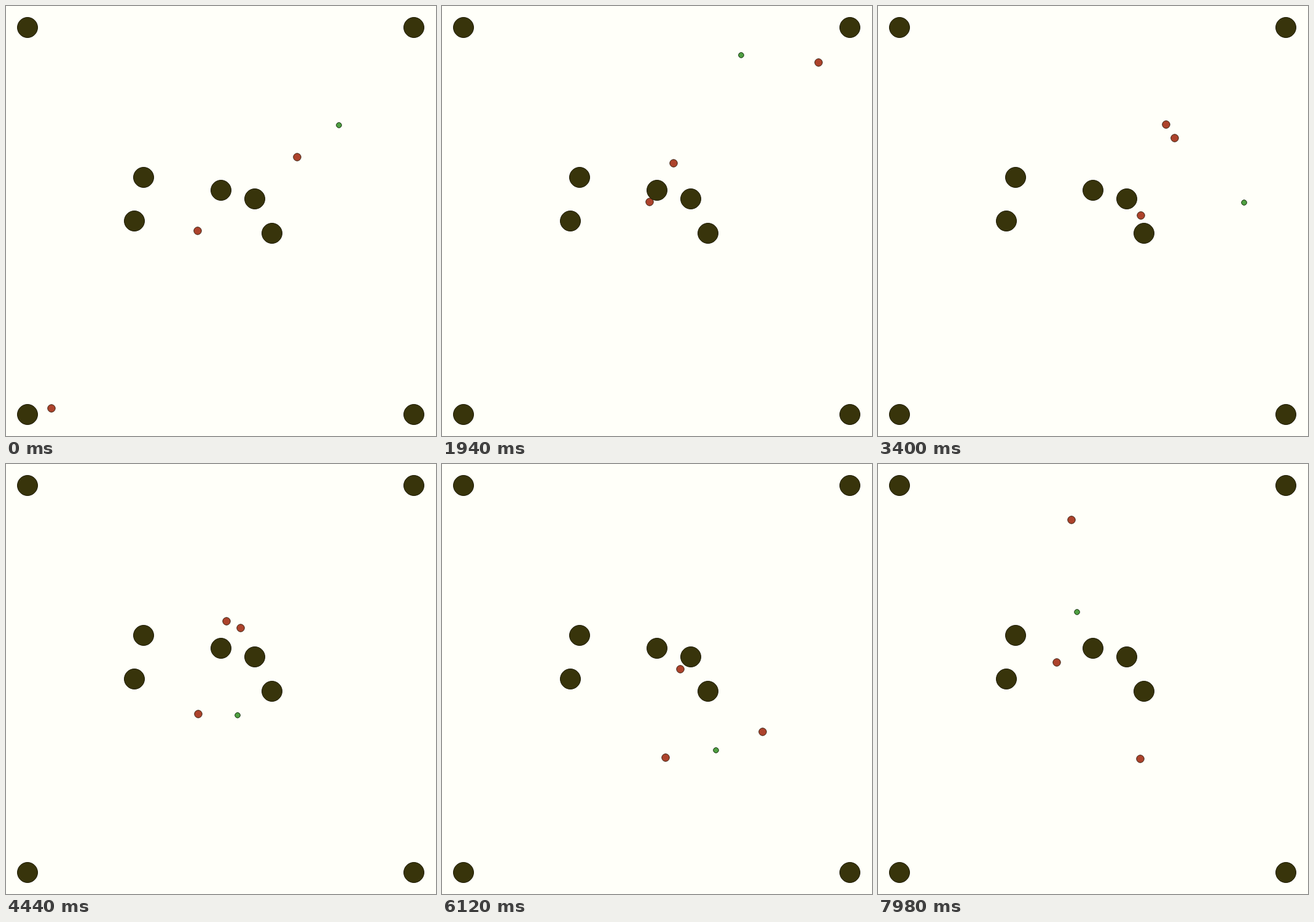
Write an HTML page with a canvas that moves like this. It is 700x700 px and loops after 8000 ms.

```html
<!DOCTYPE html>
<html lang="en">
<head>
<meta charset="utf-8">
<title>Pursuit</title>
<style>
  html, body { margin: 0; width: 100%; height: 100%; overflow: hidden; background: #fffff9; }
  canvas { display: block; }
</style>
</head>
<body>
<canvas id="stage" width="700" height="700"></canvas>
<script>
const LOOP = 8000;
const STEP = 20;
const ctx = document.getElementById('stage').getContext('2d');

const obstacles = [[224, 279], [209, 350], [350, 300], [405, 314], [433, 370]];
for (const x of [35, 664]) for (const y of [35, 665]) obstacles.push([x, y]);

// Moments at which every agent has a waypoint.
const beats = [0, 760, 1940, 3400, 4440, 6120, 7980];

// Joins the shared beats with extra turns given as [time, x, y].
function route(stops, turns) {
  return stops.map((p, i) => [beats[i], ...p])
    .concat(turns)
    .sort((a, b) => a[0] - b[0]);
}

const hunterA = route(
  [[74, 655], [163, 527], [338, 319], [428, 341], [313, 407], [364, 478], [291, 323]],
  [[1500, 308, 404], [2700, 250, 480], [5300, 220, 560], [7000, 350, 490]]
);
const hunterB = route(
  [[312, 366], [435, 228], [377, 256], [469, 193], [359, 256], [388, 334], [315, 91]],
  [[300, 312, 285], [2700, 475, 140], [5200, 475, 185], [5760, 388, 254], [6900, 285, 270]]
);
const hunterC = route(
  [[474, 246], [461, 204], [613, 92], [483, 215], [382, 267], [522, 436], [427, 480]],
  [[2500, 610, 120], [5300, 600, 340], [7000, 450, 490]]
);
const runner = route(
  [[542, 194], [530, 116], [487, 80], [596, 320], [377, 409], [446, 466], [324, 241]],
  [[380, 646, 49], [2600, 640, 60], [3850, 540, 640], [5150, 680, 62],
   [5650, 580, 370], [7000, 17, 300], [7600, 270, 50]]
);

function slope(path, i, axis) {
  const a = path[Math.max(i - 1, 0)];
  const b = path[Math.min(i + 1, path.length - 1)];
  return (b[axis] - a[axis]) / (b[0] - a[0]);
}

// Smooth curve through unevenly timed waypoints.
function position(path, time) {
  let i = 0;
  while (i < path.length - 2 && time >= path[i + 1][0]) i++;
  const a = path[i], b = path[i + 1];
  const span = b[0] - a[0];
  const u = (time - a[0]) / span;
  const v = 1 - u;
  const ease = u * u * (3 - 2 * u);
  return [1, 2].map(axis => Math.round(
    a[axis] + (b[axis] - a[axis]) * ease +
    u * v * span * (v * slope(path, i, axis) - u * slope(path, i + 1, axis))
  ));
}

function disc([x, y], radius, fill, line) {
  ctx.beginPath();
  ctx.arc(x, y, radius, 0, Math.PI * 2);
  ctx.fillStyle = fill;
  ctx.fill();
  ctx.strokeStyle = line;
  ctx.stroke();
}

function draw(time) {
  ctx.fillStyle = '#fffff9';
  ctx.fillRect(0, 0, 700, 700);
  for (const path of [hunterA, hunterB, hunterC]) {
    disc(position(path, time), 6.2, '#ad432c', '#35200f');
  }
  disc(position(runner, time), 4.3, '#4fa042', '#17300f');
  for (const spot of obstacles) disc(spot, 16.5, '#38340b', '#1c1a04');
}

const start = performance.now();
function tick() {
  const elapsed = (performance.now() - start) % LOOP;
  draw(Math.floor(elapsed / STEP) * STEP);
  requestAnimationFrame(tick);
}
tick();
</script>
</body>
</html>
```
